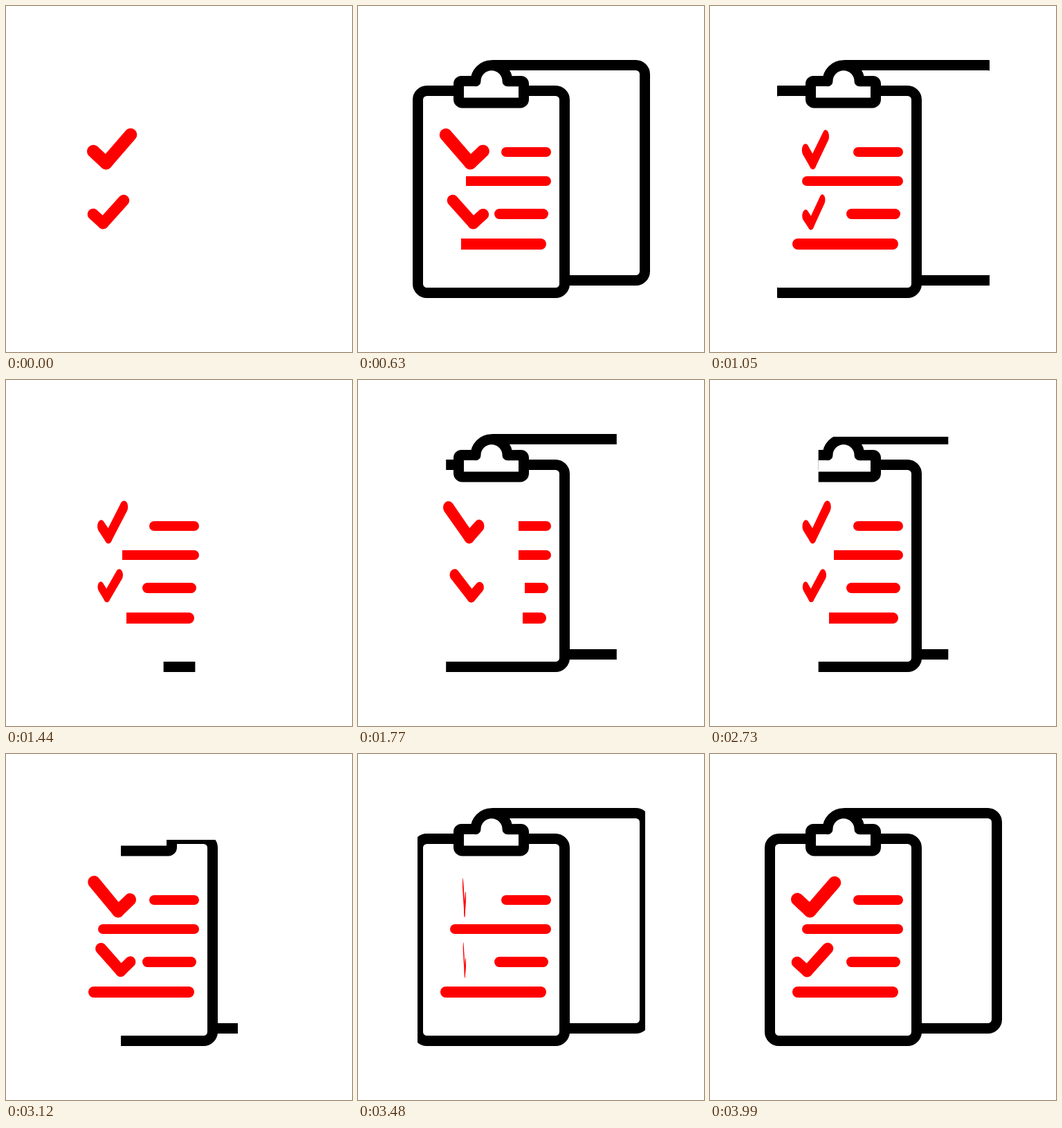
Write an HTML page with a canvas that moves like this. It is 500 by 500 pixels and loops after 8000 ms.

```html
<!DOCTYPE html>
<html lang="en">
<head>
<meta charset="utf-8">
<title>Checklist</title>
<style>
html, body { margin: 0; width: 100%; height: 100%; overflow: hidden; background: #fff; }
canvas { display: block; width: 500px; height: 500px; }
</style>
</head>
<body>
<canvas id="stage" width="500" height="500"></canvas>
<script>
const ctx = document.getElementById('stage').getContext('2d');
const LOOP = 8000, STEP = 30, END = 3990;
const RED = '#f00';

// Board reveal: time and openness, linear between the points
const OPEN = [[0, 0], [741, 1], [1482, 0], [2205, 1], [2928, 0], [3728, 1]];

// Bars: left, right, centre y, thickness, lead when leaving (ms)
const BARS = [
  [207, 279, 211, 14, 0],
  [133, 279, 253, 14, 0],
  [197, 275, 300.5, 15, 67],
  [119, 272, 344, 16, 67]
];

// Ticks: radius and three points
const TICKS = [
  { r: 9.2, pts: [[126.3, 210], [144.5, 227], [180, 186]] },
  { r: 8.2, pts: [[126, 301], [140.3, 314], [170, 281]] }
];
const PIVOT = { x: 153.4, y: 249, depth: 700 };

function track(keys, t) {
  for (let i = 1; i < keys.length; i++) {
    const [t0, a] = keys[i - 1], [t1, b] = keys[i];
    if (t < t1) return a + (b - a) * (t - t0) / (t1 - t0);
  }
  return keys[keys.length - 1][1];
}

function strokeBoard() {
  ctx.strokeStyle = '#000';
  ctx.fillStyle = '#fff';
  ctx.lineWidth = 15;
  ctx.lineJoin = 'round';

  // back sheet
  ctx.beginPath();
  ctx.moveTo(193, 85.5);
  ctx.arcTo(414.5, 85.5, 414.5, 396.5, 13);
  ctx.arcTo(414.5, 396.5, 298, 396.5, 13);
  ctx.lineTo(298, 396.5);
  ctx.stroke();

  // front sheet
  ctx.beginPath();
  ctx.roundRect(86.5, 122.5, 212, 292, 13);
  ctx.fill();
  ctx.stroke();

  // clip
  ctx.beginPath();
  ctx.moveTo(193, 140);
  ctx.arcTo(145.5, 140, 145.5, 108.5, 5);
  ctx.arcTo(145.5, 108.5, 170, 108.5, 4);
  ctx.lineTo(170, 108.5);
  ctx.arc(193, 108.8, 23, Math.PI, 0);
  ctx.arcTo(239.5, 108.5, 239.5, 140, 4);
  ctx.arcTo(239.5, 140, 193, 140, 5);
  ctx.closePath();
  ctx.fill();
  ctx.stroke();
}

function drawBoard(t) {
  const u = track(OPEN, t);
  if (u <= 0) return;
  const half = 175 * (1 - Math.pow(1 - u, 2.4));
  const height = 344 * Math.min(1, u / 0.277);
  ctx.save();
  ctx.beginPath();
  ctx.rect(250.5 - half, 422 - height, half * 2, height + 2);
  ctx.clip();
  strokeBoard();
  ctx.restore();
}

function barLength(t, lead) {
  const ms = t < 2112 ? Math.min(t, 2009 - lead - t) : t - 2215;
  return Math.max(0, 0.195 * ms);
}

function drawBars(t) {
  ctx.fillStyle = RED;
  for (const [left, right, y, size, lead] of BARS) {
    const len = barLength(t, lead);
    if (!len) continue;
    ctx.save();
    ctx.beginPath();
    ctx.rect(Math.round(right - len), y - size, len + 2, size * 2);
    ctx.clip();
    ctx.beginPath();
    ctx.roundRect(left, y - size / 2, right - left, size, size / 2);
    ctx.fill();
    ctx.restore();
  }
}

function tickAngle(t) {
  if (t < 3480) return Math.min(0.306 * t, 7.5 + 0.2812 * t);
  const v = Math.min(1, (t - 3480) / (END - 3480));
  return 986 + 94 * (1 - Math.pow(1 - v, 1.525));
}

// Turn a point about the vertical axis, with perspective
function project(x, y, cos, sin) {
  const dx = x - PIVOT.x;
  const s = PIVOT.depth / (PIVOT.depth - dx * sin);
  return [PIVOT.x + dx * cos * s, PIVOT.y + (y - PIVOT.y) * s];
}

function fillCapsule([ax, ay], [bx, by], r, cos, sin) {
  const dir = Math.atan2(by - ay, bx - ax), n = 20;
  ctx.beginPath();
  for (let end = 0; end < 2; end++) {
    const cx = end ? ax : bx, cy = end ? ay : by;
    for (let i = 0; i <= n; i++) {
      const a = dir - Math.PI / 2 + Math.PI * (end + i / n);
      ctx.lineTo(...project(cx + r * Math.cos(a), cy + r * Math.sin(a), cos, sin));
    }
  }
  ctx.fill();
}

function drawTicks(t) {
  const a = tickAngle(t) * Math.PI / 180;
  const cos = Math.cos(a), sin = Math.sin(a);
  ctx.fillStyle = RED;
  for (const { r, pts } of TICKS) {
    fillCapsule(pts[0], pts[1], r, cos, sin);
    fillCapsule(pts[1], pts[2], r, cos, sin);
  }
}

function draw(now) {
  const t = Math.min(END, Math.floor((now % LOOP) / STEP) * STEP);
  ctx.fillStyle = '#fff';
  ctx.fillRect(0, 0, 500, 500);
  drawBoard(t);
  drawBars(t);
  drawTicks(t);
}

const start = performance.now();
function frame() {
  draw(performance.now() - start);
  requestAnimationFrame(frame);
}
frame();
</script>
</body>
</html>
```
